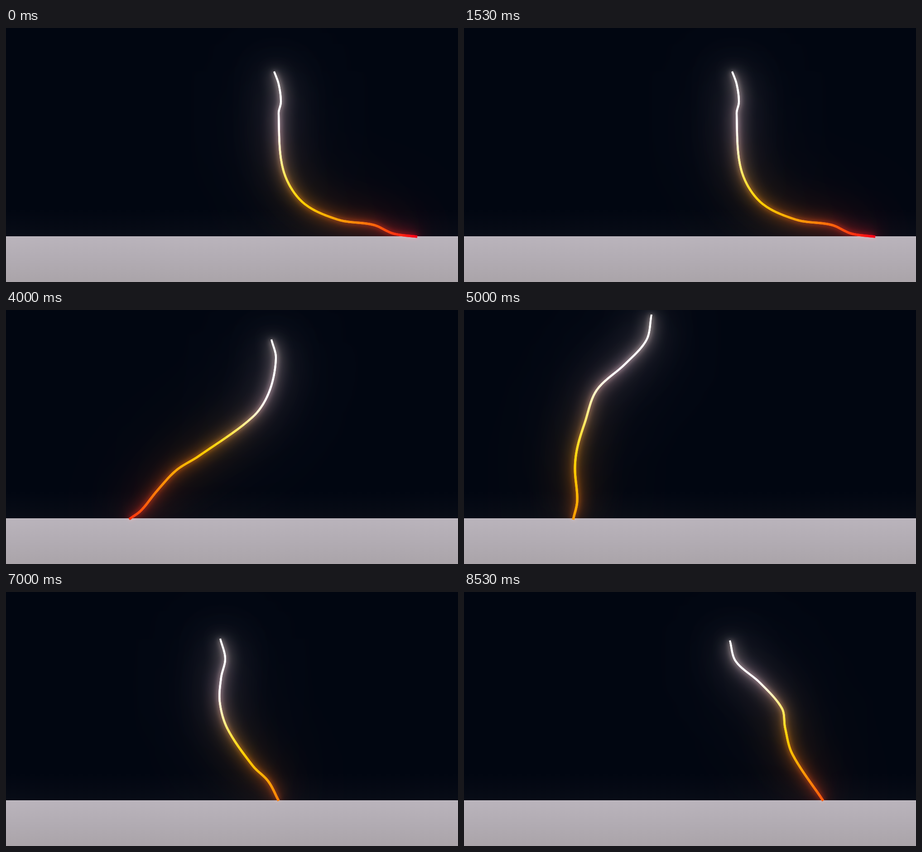
Write an HTML page with a canvas that moves like this. It is 998x561 px and loops after 8.71 s.

```html
<!DOCTYPE html>
<html lang="en">
<head>
<meta charset="utf-8">
<title>Lightning</title>
<style>
html, body { margin: 0; width: 100%; height: 100%; overflow: hidden; background: #010612; }
canvas { display: block; width: 100vw; height: 100vh; }
</style>
</head>
<body>
<canvas id="stage" width="998" height="561"></canvas>
<script>
const W = 998, H = 561, HORIZON = 460, LOOP = 8710, STEPS = 10;
const ctx = document.getElementById('stage').getContext('2d');

const smooth = x => {
  const k = Math.min(1, Math.max(0, x));
  return k * k * (3 - 2 * k);
};

// White, yellow, orange, red as t goes from 0 to 1.
const heat = t => [255, 255 * (1 - t ** 2.7), 255 * (1 - smooth((t - 0.2) / 0.36)) + 24 * t ** 4];

const coreColor = t => `rgb(${heat(t).map(Math.round)})`;

// The bloom is warmer than the bolt itself.
const haloColor = t => {
  const [r, g, b] = heat(t);
  return `rgb(${[r, g * (0.9 - 0.4 * t), b * 0.82].map(Math.round)})`;
};

function layer() {
  const c = document.createElement('canvas');
  c.width = W;
  c.height = H;
  return c;
}

function fade(g, y0, y1, ...colors) {
  const grad = g.createLinearGradient(0, y0, 0, y1);
  colors.forEach((c, i) => grad.addColorStop(i / (colors.length - 1), c));
  g.fillStyle = grad;
  g.fillRect(0, y0, W, y1 - y0);
}

function drawRoom(g) {
  fade(g, 0, HORIZON, '#010611', '#010611');
  fade(g, HORIZON - 60, HORIZON, '#010611', '#080c16');
  fade(g, HORIZON, H, '#bab4bc', '#b2acb3', '#aaa4a9');
}

// Smooth curve through the key points, spaced by chord length.
function spline(keys) {
  const gap = (a, b) => Math.hypot(b[0] - a[0], b[1] - a[1]);
  const slope = (i, axis) => {
    const a = keys[Math.max(0, i - 1)], m = keys[i], b = keys[Math.min(keys.length - 1, i + 1)];
    return (b[axis] - a[axis]) / (gap(a, m) + gap(m, b));
  };
  const pts = [keys[0]];
  for (let i = 1; i < keys.length; i++) {
    const a = keys[i - 1], b = keys[i], len = gap(a, b);
    for (let s = 1; s <= STEPS; s++) {
      const u = s / STEPS, v = 1 - u;
      pts.push([0, 1].map(k =>
        v * v * (1 + 2 * u) * a[k] + u * u * (3 - 2 * u) * b[k] +
        len * u * v * (v * slope(i - 1, k) - u * slope(i, k))));
    }
  }
  return pts;
}

function trace(pts, reach, color, width) {
  const c = layer(), g = c.getContext('2d');
  const dist = [0];
  for (let i = 1; i < pts.length; i++) {
    dist.push(dist[i - 1] + Math.hypot(pts[i][0] - pts[i - 1][0], pts[i][1] - pts[i - 1][1]));
  }
  g.lineJoin = 'round';
  for (let i = 1; i < pts.length; i++) {
    const t = dist[i] / dist[dist.length - 1];
    g.strokeStyle = color(reach * t);
    g.lineWidth = width(t);
    g.beginPath();
    pts.slice(i - 1, i + 2).forEach(p => g.lineTo(...p));
    g.stroke();
  }
  return c;
}

function glow(g, halo, y, h, blurs) {
  g.save();
  g.beginPath();
  g.rect(0, y, W, h);
  g.clip();
  g.globalCompositeOperation = 'lighter';
  for (const [radius, alpha] of blurs) {
    g.filter = `blur(${radius}px)`;
    g.globalAlpha = alpha;
    g.drawImage(halo, 0, 0);
  }
  g.restore();
}

// Renders one whole scene, shown from time "at" on.
function strike(at, reach, ...keys) {
  const pts = spline(keys);
  const core = trace(pts, reach, coreColor, t => 4 + 1.2 * t);
  const halo = trace(pts, reach, haloColor, () => 8);
  const scene = layer(), g = scene.getContext('2d');
  drawRoom(g);
  glow(g, halo, 0, HORIZON, [[90, 0.7], [42, 0.9], [16, 0.8], [6, 0.4]]);
  glow(g, halo, HORIZON, H, [[4, 0.15]]);
  g.drawImage(core, 0, 0);
  return { at, scene };
}

const strikes = [
  strike(0, 1, [592, 96], [602, 124], [607, 163], [602, 189], [612, 313],
    [654, 384], [732, 423], [812, 435], [855, 454], [908, 461]),
  strike(2570, 0.92, [586, 65], [596, 107], [581, 181], [545, 236], [425, 323],
    [376, 354], [333, 400], [298, 443], [272, 462]),
  strike(4070, 0.7, [414, 10], [403, 66], [356, 119], [293, 177], [267, 248],
    [250, 305], [245, 351], [250, 421], [241, 463]),
  strike(5570, 0.77, [473, 103], [484, 147], [475, 189], [472, 243], [489, 302],
    [545, 384], [579, 418], [602, 461]),
  strike(8200, 0.85, [587, 107], [600, 153], [654, 201], [702, 257], [709, 300],
    [725, 358], [793, 461])
];

const start = performance.now();

function frame() {
  const t = (performance.now() - start) % LOOP;
  const current = strikes.filter(s => t >= s.at).pop() || strikes[0];
  ctx.drawImage(current.scene, 0, 0);
  requestAnimationFrame(frame);
}
frame();
</script>
</body>
</html>
```
